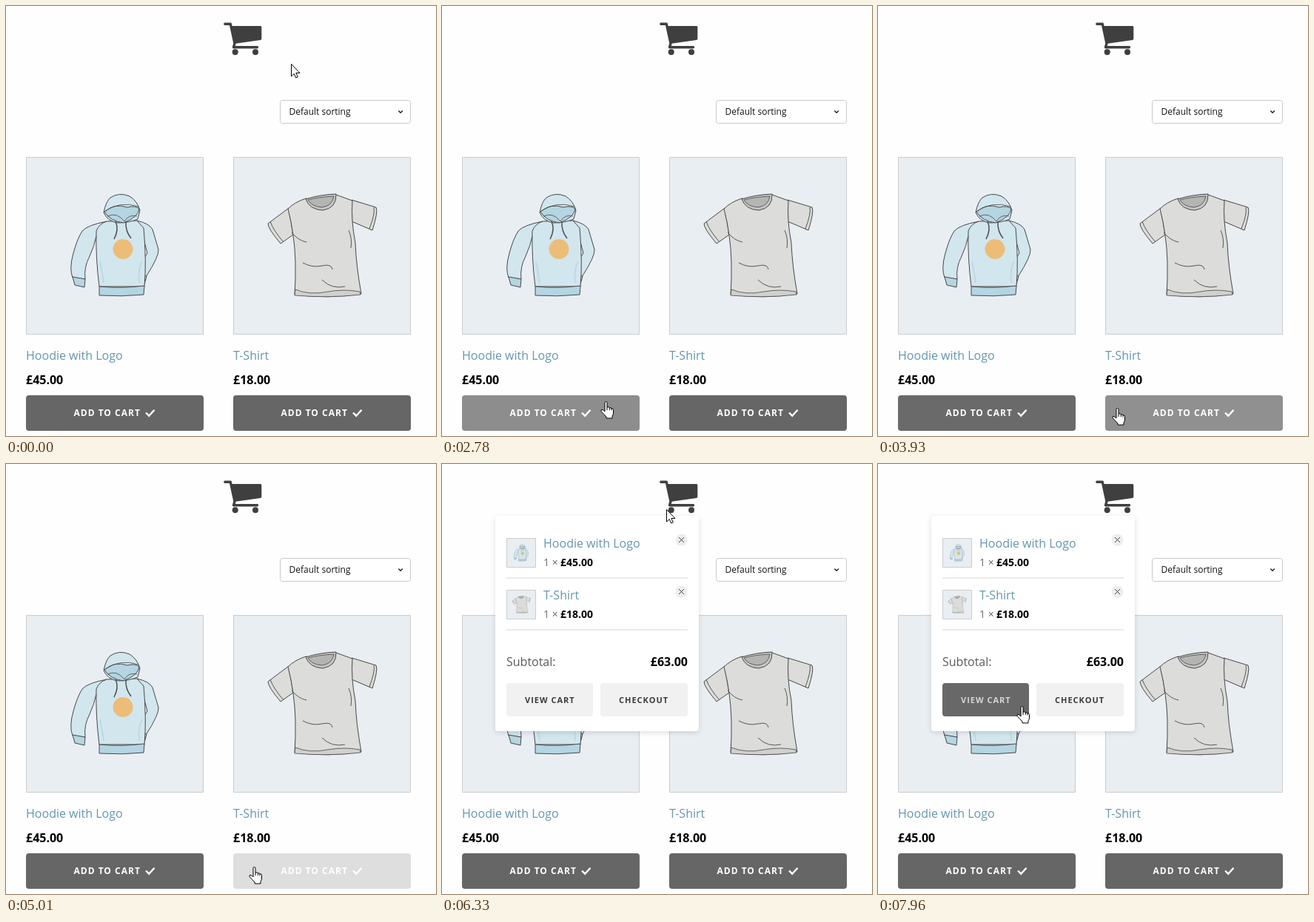
These frames come from a looping animation (581x581 px, 8 s). An HTML page with a canvas:

```html
<!DOCTYPE html>
<html lang="en">
<head>
<meta charset="utf-8">
<title>Shop cart</title>
<style>
html, body { margin: 0; width: 100%; height: 100%; overflow: hidden; background: #fefefe; }
canvas { display: block; }
</style>
</head>
<body>
<canvas id="stage" width="581" height="581"></canvas>
<script>
const ctx = document.getElementById('stage').getContext('2d');
const LOOP = 8000;
const LINK = '#6497ad';
const INK = '#484848';

// Pointer stops: time, x, y
const STOPS = [
  [0, 385, 78], [209, 385, 78], [210, 381, 77], [380, 381, 77], [680, 342, 54], [980, 318, 42],
  [1380, 318, 42], [1750, 323, 187], [1910, 313, 246], [2080, 313, 246],
  [2780, 221, 534], [2920, 221, 522], [3100, 221, 522], [3160, 215, 522],
  [3450, 215, 522], [3930, 323, 543], [4080, 332, 544], [4160, 335, 544],
  [5060, 335, 544], [5320, 324, 356], [5420, 324, 356], [5800, 300, 106],
  [5960, 300, 106], [6330, 303, 61], [6560, 305, 55], [6800, 305, 55],
  [7100, 264, 130], [7410, 240, 220], [7500, 240, 220], [7900, 194, 327], [8000, 194, 327]
];

const clamp = v => Math.max(0, Math.min(1, v));
const ramp = (t, a, b) => clamp((t - a) / (b - a));
const pulse = (t, a, b, c, d) => ramp(t, a, b) - ramp(t, c, d);
const mix = (a, b, k) => Math.round(a + (b - a) * k);
const gray = v => `rgb(${v},${v},${v})`;
const inside = (x, y, l, t, r, b) => x >= l && x <= r && y >= t && y <= b;

function pointerAt(t) {
  const i = Math.max(1, STOPS.findIndex(s => s[0] > t));
  const [t0, x0, y0] = STOPS[i - 1], [t1, x1, y1] = STOPS[i];
  const k = ramp(t, t0, t1);
  return [mix(x0, x1, k), mix(y0, y1, k)];
}

function text(str, x, y, size, color, weight = 400, spacing = 0, align = 'left') {
  ctx.font = `${weight} ${size}px "Open Sans", sans-serif`;
  ctx.letterSpacing = spacing + 'px';
  ctx.textAlign = align;
  ctx.fillStyle = color;
  ctx.fillText(str, x, y);
}

function box(x, y, w, h, r, fill, stroke) {
  ctx.beginPath();
  ctx.roundRect(x, y, w, h, r);
  ctx.fillStyle = fill;
  ctx.fill();
  if (stroke) { ctx.strokeStyle = stroke; ctx.lineWidth = 1; ctx.stroke(); }
}

function shape(d, fill, stroke, width = 1) {
  const path = new Path2D(d);
  if (fill) { ctx.fillStyle = fill; ctx.fill(path); }
  if (stroke) { ctx.strokeStyle = stroke; ctx.lineWidth = width; ctx.stroke(path); }
}

function disc(x, y, r, fill) {
  ctx.beginPath();
  ctx.arc(x, y, r, 0, Math.PI * 2);
  ctx.fillStyle = fill;
  ctx.fill();
}

function hoodie() {
  const pale = '#d2e6ee', deep = '#b4d5e1';
  shape('M136 291Q110 296 103 304Q96 315 91 334Q85 355 90 367L107 369Q105 353 113 338Q119 325 122 311Z', pale, INK);
  shape('M177 290Q194 294 198 302L206 329Q207 338 189 366L174 359L191 334L186 315Z', pale, INK);
  shape('M90 366L107 369L106 380L93 377Z', deep, INK);
  shape('M174 359L190 365L187 376L170 371Z', deep, INK);
  shape('M136 291Q126 294 122 304Q121 340 126 379H187Q190 345 186 300L177 290Z', pale, INK);
  shape('M126 379Q156 382 187 378L186 390Q156 393 126 391Z', deep, INK);
  shape('M132 279Q135 264 141 259Q153 251 167 257Q177 263 181 276L178 288Q166 293 151 293Q137 291 132 279Z', pale, INK);
  shape('M133 278Q147 266 164 272Q175 269 180 274Q179 285 159 293Q141 291 133 278Z', deep, INK);
  shape('M134 277Q154 263 179 271M137 284Q150 278 160 291Q166 281 177 284', null, INK, .8);
  shape('M148 291Q153 302 146 315M162 291Q161 304 169 314', null, INK, 1.4);
  shape('M127 345Q130 360 132 374M184 345Q178 355 180 374', null, '#bddae4', 2);
  disc(158, 328.5, 13.5, '#ecbd78');
}

function shirt() {
  const cloth = '#dcdcda', shade = '#c6c6c3';
  shape('M382 273L354 294Q354 301 371 321L388 309Z', cloth, INK);
  shape('M467 262L500 272Q503 278 495 303L467 291Z', cloth, INK);
  shape('M405 260Q390 265 381 274Q386 294 388 310Q393 344 390 390Q435 396 480 389Q473 350 472 320Q466 290 468 263L446 255Q430 266 405 260Z', cloth, INK);
  shape('M405 261Q423 255 446 254Q447 273 428 276Q410 275 405 261Z', shade, INK);
  shape('M408 262Q422 258 443 257Q441 270 427 272Q413 271 408 262Z', '#b4b5b3', INK, .8);
  shape('M391 383Q410 391 435 386Q457 382 478 386L479 390Q435 395 390 391Z', '#d0d0cd', INK, .8);
  shape('M386 306Q395 317 406 319M401 347Q414 354 427 351T441 356M427 370Q440 383 458 379M463 303Q468 314 466 327M357 291Q361 303 375 319M497 272Q499 280 491 301', null, INK, .9);
}

function picture(x, y, scale, art, artLeft) {
  const side = 240 * scale;
  box(x + .5, y + .5, side - 1, side - 1, 0, '#e9eef3', '#cbcccd');
  ctx.save();
  ctx.translate(x, y);
  ctx.scale(scale, scale);
  ctx.translate(-artLeft, -204);
  art();
  ctx.restore();
}

function product(x, name, price, art, hover, loading) {
  picture(x, 204, 1, art, x);
  text(name, x, 478, 16, LINK);
  text(price, x, 511, 16, '#000', 700);
  ctx.globalAlpha = 1 - .73 * loading;
  box(x, 526, 240, 48, 4, gray(mix(102, 144, hover)));
  ctx.globalAlpha = 1;
  text('ADD TO CART', x + 64.5, 554, 12, '#fff', 700, 1);
  shape(`M${x + 162} 549.5l4.2 4.2l7.3 -8`, null, '#fff', 2.4);
}

function cartIcon() {
  const dark = '#3f3f3f';
  ctx.save();
  ctx.lineCap = ctx.lineJoin = 'round';
  shape('M295.8 24.3H303.3L309 50.5L307.5 55.8H339.5', null, dark, 3.4);
  shape('M303.5 27H343.8Q345.3 27 345.3 28.5V44Q345.3 45.6 343.8 45.9L308.5 51Z', dark);
  disc(309.7, 62.2, 4, dark);
  disc(337, 62.2, 4, dark);
  ctx.restore();
}

function panel(height, alpha, content) {
  if (alpha <= 0) return;
  ctx.save();
  ctx.globalAlpha = alpha;
  ctx.shadowColor = 'rgba(0,0,0,.13)';
  ctx.shadowBlur = 7;
  ctx.shadowOffsetY = 2;
  box(72, 70, 275, height, 4, '#fff');
  ctx.shadowColor = 'transparent';
  content();
  ctx.restore();
}

function cartRow(y, name, price, art, artLeft) {
  picture(87, y, 1 / 6, art, artLeft);
  text(name, 137, y + 13, 16, LINK);
  text('1 ×', 137, y + 38, 14, '#666');
  text(price, 160, y + 38, 14, '#000', 700);
  disc(323.5, y + 2.5, 8, '#ededed');
  shape(`M320 ${y - 1}l7 7m0 -7l-7 7`, null, '#444', 1);
  ctx.fillStyle = '#ebebeb';
  ctx.fillRect(87, y + 53, 245, 2);
}

function fullCart(hover) {
  cartRow(100, 'Hoodie with Logo', '£45.00', hoodie, 27);
  cartRow(170, 'T-Shirt', '£18.00', shirt, 307);
  text('Subtotal:', 87, 273, 16, '#5a5a5a');
  text('£63.00', 332, 273, 16, '#000', 700, 0, 'right');
  box(87, 296, 117, 45, 4, gray(mix(241, 104, hover)));
  box(214, 296, 118, 45, 4, '#f1f1f1');
  text('VIEW CART', 112, 323, 11, gray(mix(58, 214, hover)), 700, 1);
  text('CHECKOUT', 239, 323, 11, '#3a3a3a', 700, 1);
}

function isLink(x, y, cartOpen) {
  if (cartOpen && inside(x, y, 72, 70, 347, 361)) {
    return inside(x, y, 87, 296, 332, 341) || inside(x, y, 137, 98, 268, 117);
  }
  const overColumn = inside(x, y, 27, 0, 267, 581) || inside(x, y, 307, 0, 547, 581);
  return overColumn && (inside(x, y, 0, 204, 581, 444) || inside(x, y, 0, 526, 581, 574) || inside(x, y, 0, 515, 581, 526));
}

function pointer(x, y, hand) {
  ctx.save();
  ctx.lineJoin = 'round';
  if (hand) {
    ctx.translate(x - 7, y);
    shape('M6 14V2.2Q6 .5 7.5 .5T9 2.2V8Q12 7 12.3 9Q14.7 8 15 10Q17.5 9.5 17.5 11.5V16Q17.5 18 16 20V23H8V21Q5 18 1 13.5Q.5 11 3 11.5Q5 13 6 14Z', '#fff', '#000');
    shape('M9 8V12M12.3 9V12M15 10V12.5', null, '#000');
  } else {
    ctx.translate(x + .5, y + .5);
    shape('M0 0V16.5L3.8 13L6.2 18.5L8.8 17.4L6.4 12H11.5Z', '#fff', '#000');
  }
  ctx.restore();
}

function draw(t) {
  ctx.fillStyle = '#fefefe';
  ctx.fillRect(0, 0, 581, 581);
  cartIcon();
  box(370.5, 127.5, 176, 31, 3, '#fff', '#c9c9c9');
  text('Default sorting', 382.5, 147, 12, '#111');
  shape('M530.3 141.5l2.8 2.8l2.8 -2.8', null, '#222', 1.5);

  product(27, 'Hoodie with Logo', '£45.00', hoodie,
    pulse(t, 2550, 2800, 3680, 3960), pulse(t, 3250, 3560, 3620, 3900));
  product(307, 'T-Shirt', '£18.00', shirt,
    pulse(t, 3680, 3930, 5060, 5320), pulse(t, 4420, 4790, 5000, 5300));

  panel(85, pulse(t, 640, 960, 1420, 1740), () =>
    text('No products in the cart.', 209.5, 119, 16, '#666', 400, 0, 'center'));
  const cartAlpha = ramp(t, 6000, 6320);
  panel(291, cartAlpha, () => fullCart(ramp(t, 7660, 7940)));

  const [x, y] = pointerAt(t);
  pointer(x, y, isLink(x, y, cartAlpha > 0));
}

function tick() {
  draw(performance.now() % LOOP);
  requestAnimationFrame(tick);
}
tick();
</script>
</body>
</html>
```
